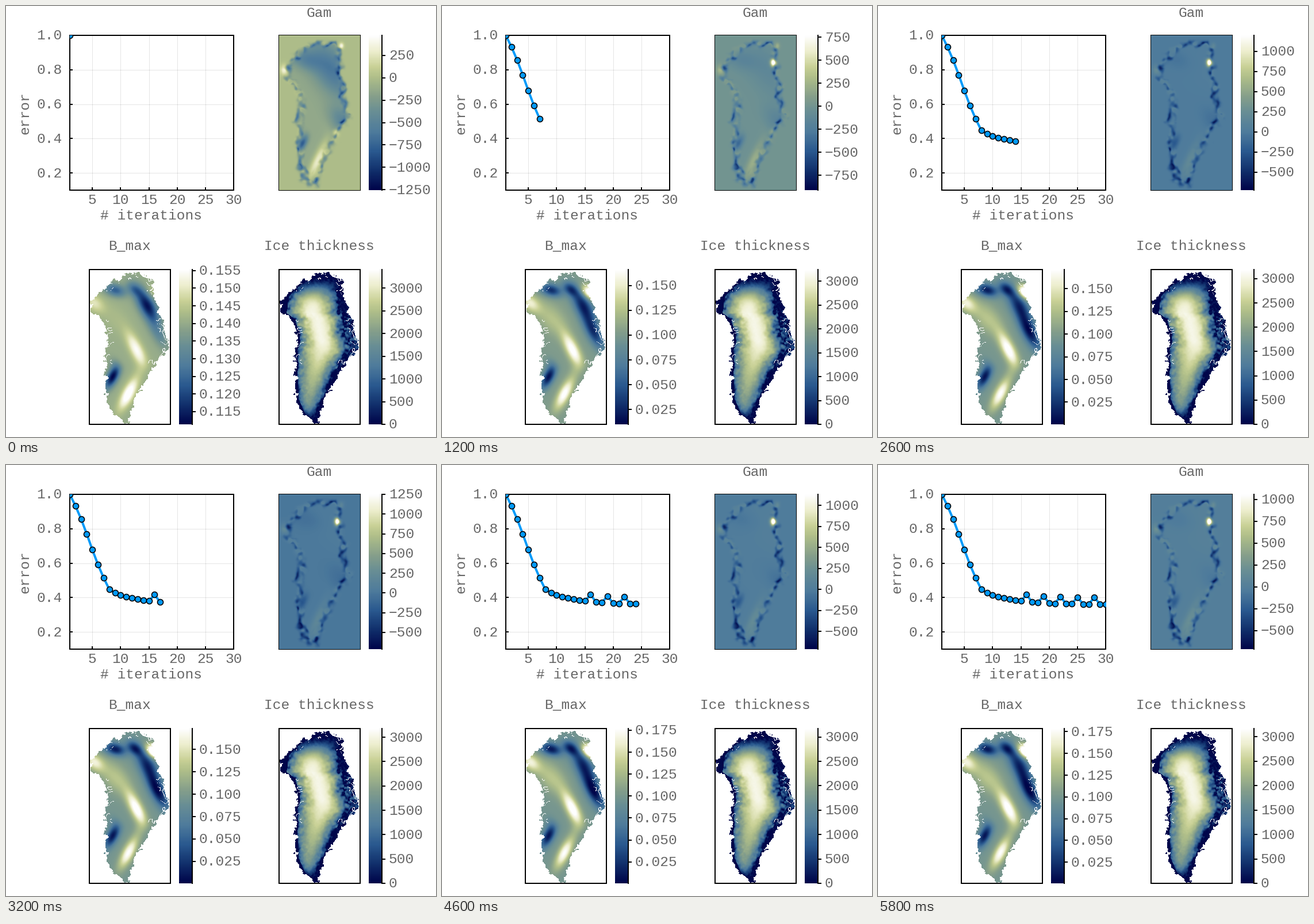
Write a matplotlib script that moves like this. It is 748 px wide and 749 px high and loops after 6000 ms.

```python
import numpy as np
import matplotlib.pyplot as plt
from matplotlib.animation import FuncAnimation
from matplotlib.collections import LineCollection
from matplotlib.colors import LinearSegmentedColormap
from matplotlib.patches import Rectangle

SW, SH, DPI = 748, 749, 100
PX = 72 / DPI
N = 30
W, H = 141, 269
INK = "#666666"
plt.rcParams["font.family"] = "Liberation Mono"
plt.rcParams["font.size"] = 24.5 * PX

CMAP = LinearSegmentedColormap.from_list("ice", [
    (0, "#00054a"), (.125, "#11306c"), (.25, "#2a598f"), (.375, "#4e7b9c"),
    (.5, "#678d95"), (.6, "#849e8b"), (.73, "#afbe89"), (.8, "#c9d196"),
    (.9, "#edeece"), (1, "#fefefe")])

# west and east coast by row of the map
ROWS = [4, 12, 22, 45, 55, 75, 86, 105, 125, 137, 150, 162, 180, 225, 250, 266]
WEST = [76, 58, 38, 10, 1, 2, 21, 29, 32, 28, 24, 29, 27, 29, 40, 62]
EAST = [88, 100, 110, 112, 115, 120, 127, 131, 136, 141, 131, 116, 104, 81, 72, 69]

# blobs: x, y, width, height, amount at the start and at the end
BMAX_BLOBS = [
    (100, 62, 15, 28, -.6, -.42), (118, 108, 13, 30, -.2, -.55),
    (45, 36, 17, 11, -.38, -.5), (78, 34, 12, 12, -.25, -.4),
    (112, 40, 13, 12, .1, .75), (8, 58, 16, 16, .2, .35),
    (45, 85, 24, 30, .05, .2), (82, 140, 12, 30, .33, .5),
    (67, 216, 11, 26, .42, .45), (40, 186, 10, 20, -.65, -.5)]
GAM_BLOBS = [
    (92, 60, 34, 50, -480, 20), (45, 42, 25, 18, -300, -60),
    (110, 150, 20, 25, -320, -80), (66, 218, 9, 34, 420, 170),
    (40, 188, 7, 14, -650, -250), (128, 150, 8, 7, -350, -190)]
HOT_SPOTS = [
    (108, 18, 4, 5, 380, 150), (8, 60, 6, 9, 330, 200),
    (101, 47, 5, 7, 0, 1500), (98, 170, 5, 6, 420, 120)]

rng = np.random.default_rng(7)
YY, XX = np.mgrid[0:H, 0:W] + .5
SPINE = 90 - .45 * np.hypot(YY - 168, 8)


def noise(s):
    r = int(3 * s) + 1
    k = np.exp(-.5 * (np.arange(-r, r + 1) / s) ** 2)
    a = rng.standard_normal((H, W))
    for axis in (0, 1):
        a = np.apply_along_axis(np.convolve, axis, a, k, "same")
    return a / a.std()


def hump(v, mid, width):
    return np.exp(-((v - mid) / width) ** 2)


def blobs(items, along=True):
    """Sum of soft spots at start and end; they may follow the spine."""
    out = np.zeros((2, H, W))
    u = XX - SPINE if along else XX
    for x, y, rx, ry, *amount in items:
        spot = hump(u, u[int(y), int(x)], rx) * hump(YY, y, ry)
        out += np.reshape(amount, (2, 1, 1)) * spot
    return out


def mix(pair, k):
    return pair[0] + (pair[1] - pair[0]) * k


def inside(west, east, top, bottom):
    """Rough distance to the nearest border, negative outside."""
    dw, de = (np.hypot(1, np.gradient(c, axis=0)) for c in (west, east))
    return np.min([(XX - west) / dw, (east - XX) / de,
                   YY - top, bottom - YY], axis=0)


def make_land(west, east):
    d = inside(west, east, 3, 267)
    land = d + 1.6 * noise(2) + .9 * noise(.8) > .5
    fjord = (np.abs(noise(3)) < .13) & (d < 11)
    rugged = (YY < 38) | ((YY > 85) & (YY < 165))
    return land & ~(fjord & rugged)


def make_ice(west, east, gap):
    half = np.maximum((east - west) / 2, 1)
    s = (XX - (east + west) / 2 + 3) / half
    s *= 1 + .06 * noise(2) + .04 * noise(5)
    ridge = ((.95 - .0035 * np.maximum(YY - 125, 0))
             * (1 - hump(np.maximum(YY, 12), 12, 28))
             * (1 - hump(np.minimum(YY, 262), 262, 16)))
    thick = ridge * np.clip(1 - np.abs(s) ** 1.9, 0, 1) ** .75
    thick += .045 * noise(1.2) * np.exp(-np.maximum(gap, 0) / 12)
    hills = (.12 + .12 * noise(1.3)) * hump(YY, 115, 45) * (XX > 100)
    return np.clip(np.where(gap > 0, thick, hills), 0, 1)


def make_gam(gap):
    gap = gap + 2 * noise(4)
    cover = 1 / (1 + np.exp(-np.clip(gap, -30, 30) / 1.5))
    rim = hump(gap, 2, 5) * np.clip(.4 + .6 * noise(3), -.2, 1.6)
    base = np.reshape([-140, 10], (2, 1, 1)) + blobs(GAM_BLOBS)
    return cover * base - 400 * rim + blobs(HOT_SPOTS, False)


coast_w, coast_e = (np.interp(YY, ROWS, c) for c in (WEST, EAST))
ice_w = coast_w + 5 + 9 * hump(YY, 62, 18)
ice_e = coast_e - 5 - 13 * hump(YY, 115, 50)
GAP = inside(ice_w, ice_e, 14, 259)
LAND = make_land(coast_w, coast_e)
ICE = make_ice(ice_w, ice_e, GAP)
GAM = make_gam(GAP)
BMAX = np.reshape([.66, .55], (2, 1, 1)) + blobs(BMAX_BLOBS)

fig = plt.figure(figsize=(SW / DPI, SH / DPI), dpi=DPI, facecolor="white")
ax = fig.add_axes([0, 0, 1, 1])


def line(xs, ys, width=2, **kw):
    ax.plot(xs, ys, color="black", lw=width * PX, **kw)


def box(x, y, w, h, z=4):
    ax.add_patch(Rectangle((x, y), w, h, fill=False, ec="black",
                           lw=2 * PX, zorder=z))


def label(x, y, s, ha="center", va="baseline", **kw):
    return ax.text(x, y, s, ha=ha, va=va, color=INK, **kw)


def picture(data, x, y, w=W):
    return ax.imshow(data, cmap=CMAP, vmin=0, vmax=1, aspect="auto", zorder=2,
                     interpolation="nearest", extent=(x, x + w, y + H, y))


class Bar:
    def __init__(self, x, y):
        self.x, self.y = x + 23, y
        picture(np.linspace(1, 0, H)[:, None], x, y, 23)
        line([self.x] * 2, [y, y + H], zorder=3)
        self.marks = LineCollection([], colors="black", linewidths=2 * PX)
        ax.add_collection(self.marks)
        self.texts = [label(self.x + 12, y, "", "left") for _ in range(12)]

    def show(self, lo, hi, step, places=0):
        first, last = np.ceil(lo / step - .01), np.floor(hi / step + .01)
        vals = np.arange(first, last + 1) * step + 0.0
        ys = self.y + H * (hi - vals) / (hi - lo)
        self.marks.set_segments([[(self.x, y), (self.x + 6, y)] for y in ys])
        for t in self.texts:
            t.set_text("")
        for t, v, y in zip(self.texts, vals, ys):
            t.set_text(f"{v:.{places}f}".replace("-", "\u2212"))
            t.set_y(y + 7.5)


def px(n):
    return 111 + (n - 1) * 285 / 29


def py(e):
    return 51 + (1 - e) * 299


def error(n):
    """A near linear fall, then a slow decay with a bump every third step."""
    if n <= 8:
        return 1 - .079 * (n - 1) + .015 * np.sin(2 * np.pi * (n - 1) / 7)
    bump = .04 if n > 15 and n % 3 == 1 else 0
    return .36 + .067 * np.exp(-(n - 9) / 5) + bump


# error chart
for v in range(5, 31, 5):
    line([px(v)] * 2, [51, 320], 1, alpha=.1)
    line([px(v)] * 2, [320, 316])
    label(px(v), 344, str(v))
for v in np.arange(.2, 1.1, .2):
    line([111, 396], [py(v)] * 2, 1, alpha=.1)
    line([111, 115], [py(v)] * 2)
    label(98, py(v) + 7.5, f"{v:.1f}", "right")
box(111, 51, 285, 269)
label(253, 371, "# iterations")
label(33, 186, "error", rotation=90, va="center")
curve, = ax.plot([], [], "-o", color="#009afa", lw=4 * PX, ms=10 * PX,
                 mec="black", mew=1.6 * PX, zorder=5)
curve.set_clip_path(Rectangle((111, 51), 285, 269, transform=ax.transData))

# maps
label(545, 19, "Gam")
label(215, 424, "B_max")
label(545, 424, "Ice thickness")
gam_im = picture(GAM[0], 475, 51)
b_im = picture(BMAX[0], 145, 458)
picture(np.ma.array(ICE, mask=~LAND), 475, 458)
box(475, 51, W, H, 1)
box(145, 458, W, H)
box(475, 458, W, H)
gam_bar, b_bar, ice_bar = Bar(631, 51), Bar(301, 458), Bar(631, 458)

ax.set_xlim(0, SW)
ax.set_ylim(SH, 0)
ax.axis("off")


def update(i):
    n = i + 1
    steps = range(1, n + 1)
    curve.set_data([px(k) for k in steps], [py(error(k)) for k in steps])

    t = min(i / 9, 1)
    lo = np.interp(n, [1, 10, 17], [-1255, -740, -712])
    hi = np.interp(n, [1, 5, 10, 21, 30], [475, 474, 1214, 1171, 1059])
    if n > 16 and n % 3 == 2:
        hi = 1250
    gam_im.set_data(mix(GAM, t * t * (3 - 2 * t)))
    gam_im.set_clim(lo, hi)
    gam_bar.show(lo, hi, 250)

    lo = np.interp(n, [1, 5, 10], [.1114, .0165, .0006])
    hi = np.interp(n, [1, 5, 21, 30], [.1553, .1646, .176, .1786])
    step, places = next(s for s in ((.005, 3), (.01, 2), (.025, 3))
                        if (hi - lo) / s[0] < 9)
    level = mix(BMAX, 1 - np.exp(-i / 5))
    b_im.set_data(np.ma.array(level, mask=~LAND))
    b_bar.show(lo, hi, step, places)

    ice_bar.show(0, 3170 + 237 * np.exp(-i / 5), 500)
    return []


anim = FuncAnimation(fig, update, frames=N, init_func=lambda: update(0),
                     interval=200, repeat=True, repeat_delay=0)
plt.show()
```
